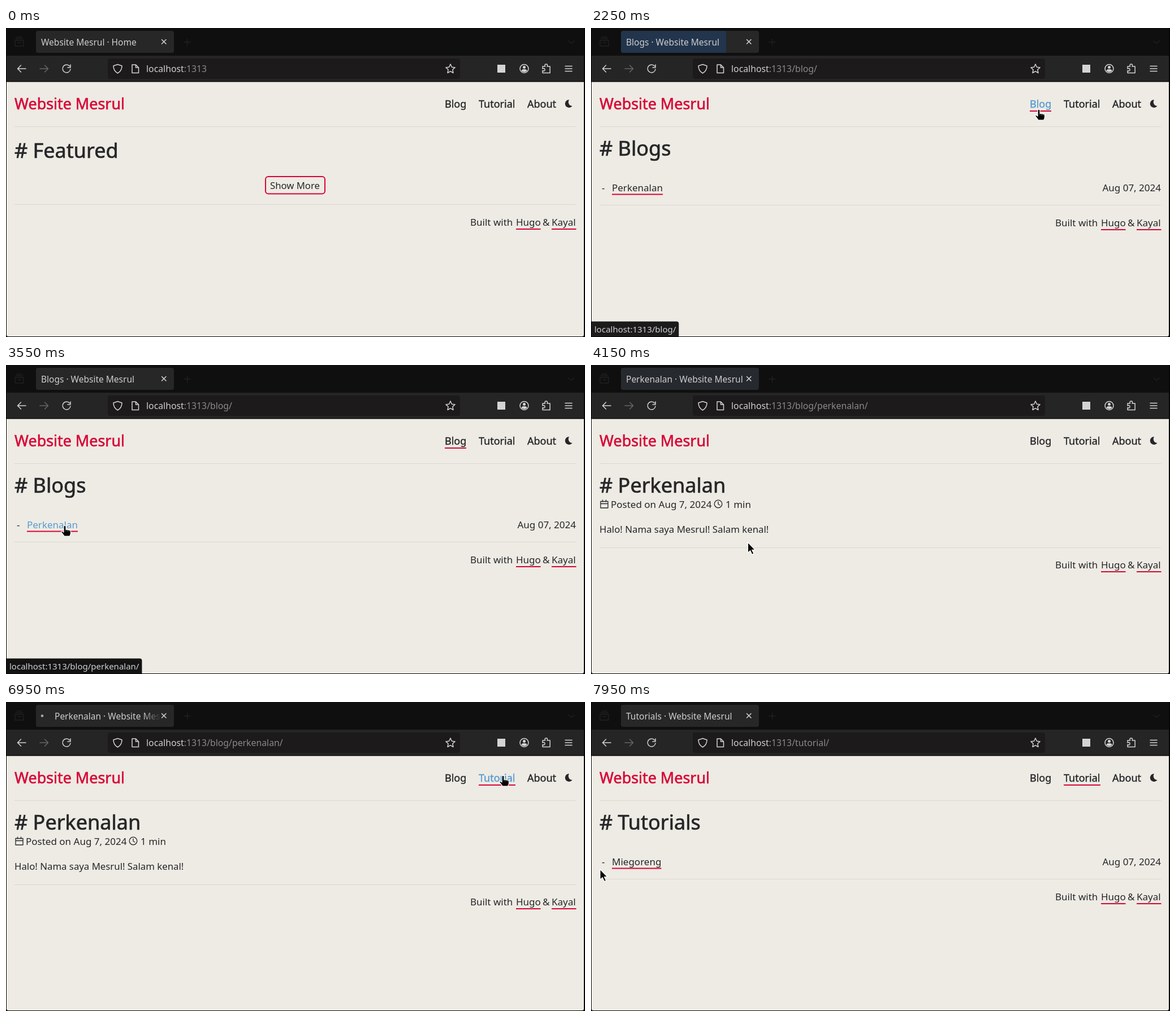
These frames come from a looping animation (1024x547 px, 8 s). An HTML page:

```html
<!DOCTYPE html>
<html lang="id">
<head>
<meta charset="utf-8">
<title>Website Mesrul</title>
<style>
  html, body { margin: 0; width: 100%; height: 100%; overflow: hidden; background: #000; }
  svg { display: block; width: 100vw; height: 100vh; }
  text { font-family: "Noto Sans", "Open Sans", sans-serif; white-space: pre; }
  .icon { fill: none; stroke: #d5d4d4; stroke-width: 1.5; stroke-linecap: round; stroke-linejoin: round; }
  .dim { stroke: #1f1f20; }
</style>
</head>
<body>
<svg viewBox="0 0 1024 547">
  <defs>
    <linearGradient id="fade" x1="240" x2="274" y1="0" y2="0" gradientUnits="userSpaceOnUse">
      <stop stop-color="#272728" stop-opacity="0"/><stop offset="1" stop-color="#272728"/>
    </linearGradient>
    <clipPath id="tabClip"><rect x="53" y="5" width="244" height="39" rx="4"/></clipPath>
  </defs>
  <rect width="1024" height="547" fill="#060606"/>
  <rect x="1" width="1021" height="49" fill="#0f0f0f"/>
  <rect x="1" y="49" width="1021" height="45" fill="#252526"/>
  <rect x="180" y="54" width="623" height="36" rx="4" fill="#1c1a1b"/>
  <path d="M1 95.500H1022V543Q1022 546 1019 546H4Q1 546 1 543Z" fill="#edebe4"/>
  <g class="icon dim">
    <path d="M16 22h15v10h-15zM17 19h13M19 16h9M21 26h5M315 25h11M320.500 19.500v11M995 23l5 4 5-4"/>
  </g>
  <g class="icon">
    <path d="M35 72H21M26.500 66l-6 6 6 6"/>
    <path d="M60 72H74M68.500 66l6 6-6 6" stroke="#666"/>
    <path d="M112.500 67.500A7 7 0 1 0 114 73M114 65v5h-5"/>
    <path d="M197.500 64.500L205 67Q205 76 197.500 80Q190 76 190 67Z"/>
    <path d="M223 65h6.500l5 5v9.500h-11.500zM229.500 65v5h5"/>
    <path d="M786 64l2.400 5.200 5.700.7-4.200 3.900 1.100 5.700-5-2.800-5 2.800 1.100-5.700-4.200-3.900 5.700-.7Z"/>
    <circle cx="916.500" cy="72" r="7.500"/>
    <path d="M949 68h4.500q-1.500-4 1.800-4t1.800 4h5v11.500h-13.100v-4q4 1.500 4-1.700t-4-1.700z"/>
    <path d="M989 67.500h12M989 72h12M989 76.500h12"/>
  </g>
  <rect x="869" y="65" width="14" height="14" fill="#d5d4d4"/>
  <path d="M911.500 76q0-3 5-3t5 3q-5 4-10 0z" fill="#d5d4d4"/>
  <circle cx="916.500" cy="69.500" r="2.500" fill="#d5d4d4"/>
  <g id="view"></g>
</svg>
<script>
const LOOP = 8000, STEP = 50;
const INK = '#262628', RED = '#d90435', BLUE = '#589bd0';
const view = document.getElementById('view');
const pen = document.createElement('canvas').getContext('2d');
const SITE = 'Website Mesrul';

// start, click before it, url path, tab title, heading
const pages = [
  { at: 0, path: '', tab: SITE + ' · Home', head: 'Featured', rule: 312.5, foot: 350 },
  { at: 2150, click: 1950, path: '/blog/', tab: 'Blogs · ' + SITE, head: 'Blogs', item: 'Perkenalan', nav: 'Blog', rule: 313.5, foot: 351 },
  { at: 3800, click: 3650, path: '/blog/perkenalan/', tab: 'Perkenalan · ' + SITE, head: 'Perkenalan', rule: 323.5, foot: 360 },
  { at: 7200, click: 6950, path: '/tutorial/', tab: 'Tutorials · ' + SITE, head: 'Tutorials', item: 'Miegoreng', nav: 'Tutorial', rule: 313.5, foot: 351 },
];
const hints = [
  [1000, 1950, '/blog/', '#080808'],
  [1950, 2850, '/blog/', '#1c1b1c'],
  [3400, 3950, '/blog/perkenalan/', '#131313'],
  [7050, 7450, '/tutorial/', '#131313'],
];
// pointer stops: time, x, y
const route = [
  [500, 908, 560], [1100, 792, 145], [2650, 792, 145], [3500, 104, 285],
  [3850, 104, 285], [4300, 338, 324], [4400, 338, 324], [4750, 316, 292],
  [4850, 316, 292], [5250, -4, 292], [5300, -4, 292], [5700, 335, 364],
  [5750, 335, 364], [5950, 468, 362], [6100, 468, 362], [6900, 879, 131],
  [7200, 879, 131], [7850, 19, 299], [7950, 16, 296],
];
const menu = [['Blog', 776, 38], ['Tutorial', 836, 65], ['About', 922, 52]];

const text = (x, y, size, fill, str, extra = '') =>
  `<text x="${x}" y="${y}" font-size="${size}" fill="${fill}" ${extra}>${str}</text>`;
const rect = (x, y, w, h, fill, extra = '') =>
  `<rect x="${x}" y="${y}" width="${w}" height="${h}" fill="${fill}" ${extra}/>`;
const medium = (color, w) => `stroke="${color}" stroke-width="${w}"`;
const inside = (p, x, y, w, h) => p.x >= x && p.x <= x + w && p.y >= y && p.y <= y + h;
const widthOf = (str, size) => {
  pen.font = size + 'px "Noto Sans", "Open Sans", sans-serif';
  return pen.measureText(str).width;
};

function pointerAt(t) {
  const i = route.findIndex(stop => stop[0] > t);
  const [t1, x1, y1] = route.at(i);
  if (i < 1) return { x: x1, y: y1 };
  const [t0, x0, y0] = route[i - 1];
  const u = (t - t0) / (t1 - t0), k = u * u * (3 - 2 * u);
  return { x: x0 + (x1 - x0) * k, y: y0 + (y1 - y0) * k };
}

function drawTab(t, page) {
  const next = pages.find(p => p.click <= t && t < p.at);
  const burst = page.at ? (t - page.at) / 400 : 1;
  let s = rect(53, 5, 244, 39, '#272728');
  if (burst < 1) {
    const w = 244 * (1 - (1 - burst) ** 5);
    s += rect(53, 5, w, 39, '#1f4068', `opacity="${0.75 * (1 - burst)}"`);
  }
  s += text(next ? 86 : 62, 30.5, 15.5, '#cfcecf', page.tab);
  if (next) {
    const x = 64 + 10 * Math.abs(Math.sin((t - next.click) / 250));
    s += `<circle cx="${x}" cy="24.500" r="2.300" fill="#aaa"/>` + rect(240, 5, 57, 39, 'url(#fade)');
  }
  return `<g clip-path="url(#tabClip)">${s}</g><path class="icon" d="M275.500 20.500l7.500 7.500M283 20.500l-7.500 7.500"/>`;
}

function drawHeader(page, p) {
  let s = text(15, 144, 26.9, RED, SITE, medium(RED, 0.6));
  for (const [name, x, w] of menu) {
    const hover = inside(p, x, 122, w, 26), color = hover ? BLUE : INK;
    s += text(x, 140.5, 18, color, name, medium(color, 0.4));
    if (hover || page.nav === name) s += rect(x, 146, w, 2, RED);
  }
  return s + `<path d="M996 127A7 7 0 1 0 1001.500 138A7 7 0 0 1 996 127Z" fill="${INK}"/>` +
    rect(15, 174, 993, 1, '#d9d7cf');
}

function drawFooter({ rule, foot }) {
  return rect(15, rule - 0.5, 993, 1, '#d9d7cf') +
    text(821, foot, 17, INK, 'Built with') + text(902, foot, 17, INK, 'Hugo') +
    text(949, foot, 17, INK, '&amp;') + text(965, foot, 17, INK, 'Kayal') +
    rect(902, foot + 5, 43.5, 2, RED) + rect(965, foot + 5, 43.5, 2, RED);
}

function drawPost(t, p) {
  const words = 'Halo! Nama saya Mesrul! Salam kenal!';
  const icons = `<g class="icon" style="stroke:${INK};stroke-width:1.3">
    <path d="M17 241.500h13v11.500h-13zM17 245.500h13M20.500 239v3M26.500 239v3"/>
    <circle cx="225" cy="246" r="6.800"/><path d="M225 242v4.500l3 1.500"/></g>`;
  let s = icons + text(35, 253, 17, INK, 'Posted on Aug 7, 2024') +
    text(238, 253, 17, INK, '1 min') + text(15, 297, 16.8, INK, words);
  if (t >= 4850 && t < 5800) {
    const end = 15 + widthOf(words, 16.8);
    const from = t >= 5250 ? 15 : Math.min(end, Math.max(15, p.x));
    const box = rect(from, 281, end - from, 21, RED);
    s += box + `<clipPath id="picked">${box}</clipPath>` +
      text(15, 297, 16.8, '#f6eeea', words, 'clip-path="url(#picked)"');
  }
  return s;
}

function drawBody(t, page, p) {
  let s = text(15, page.path ? 226 : 229.5, 36, INK, '# ' + page.head, medium(INK, 0.7));
  if (page.item) {
    const w = widthOf(page.item, 17);
    s += text(19, 288.5, 17, INK, '-') +
      text(37, 288.5, 17, inside(p, 37, 272, w, 24) ? BLUE : INK, page.item) +
      rect(37, 293.5, w, 2, RED) + text(1008, 288.5, 17, INK, 'Aug 07, 2024', 'text-anchor="end"');
  } else if (page.path) {
    s += drawPost(t, p);
  } else {
    s += rect(459, 263, 105, 30.5, 'none', `rx="5" stroke="${RED}" stroke-width="2"`) +
      text(511, 284.5, 16.7, INK, 'Show More', 'text-anchor="middle"');
  }
  return s;
}

function drawPointer(t, page, p) {
  if (t < 500) return '';
  const onLink = menu.some(([, x, w]) => inside(p, x, 122, w, 26)) ||
    (page.item && inside(p, 37, 272, 89, 24));
  const onText = page.head === 'Perkenalan' && inside(p, 15, 278, 315, 24);
  const hand = 'M-2 0Q0-2 2 0V6.500Q4 5.500 5 7Q7 6 8 7.500Q10 7 10.500 9V13Q10 16 8.500 18H-1Q-3 15-6 11.500Q-7 9-4 9.500L-2 11Z';
  const arrow = 'M0 0V18.500L4.300 14.700L7.500 21.500L10.700 20.200L7.500 13.500H13Z';
  const beam = 'M-4-9H4V-7.500H1V7.500H4V9H-4V7.500H-1V-7.500H-4Z';
  const knuckles = onLink ? '<path d="M2 6.500V9.500M5 7V10M8 7.500V10.500" stroke="#aaa" stroke-width=".6"/>' : '';
  return `<g transform="translate(${p.x} ${p.y})">
    <path d="${onLink ? hand : onText ? beam : arrow}" fill="#050505" stroke="#fff" stroke-width="1.200" stroke-linejoin="round"/>
    ${knuckles}</g>`;
}

function drawHint(t) {
  const hint = hints.find(([a, b]) => t >= a && t < b);
  if (!hint) return '';
  const label = 'localhost:1313' + hint[2], w = widthOf(label, 15) + 11;
  return `<path d="M1 519.500H${w - 4}Q${w} 519.500 ${w} 523.500V546H1Z" fill="${hint[3]}"/>` +
    text(6, 539, 15, '#d2d1d1', label);
}

function draw(t) {
  const page = pages.findLast(p => p.at <= t), p = pointerAt(t);
  const url = `localhost<tspan fill="#8b898a">:1313${page.path}</tspan>`;
  view.innerHTML = drawTab(t, page) + text(248, 77.5, 15.8, '#d0cfcf', url) +
    drawHeader(page, p) + drawBody(t, page, p) + drawFooter(page) +
    drawHint(t) + drawPointer(t, page, p);
}

let shown = -1;
const begin = performance.now();
function tick() {
  const t = Math.floor((performance.now() - begin) % LOOP / STEP) * STEP;
  if (t !== shown) draw(shown = t);
  requestAnimationFrame(tick);
}
tick();
</script>
</body>
</html>
```
